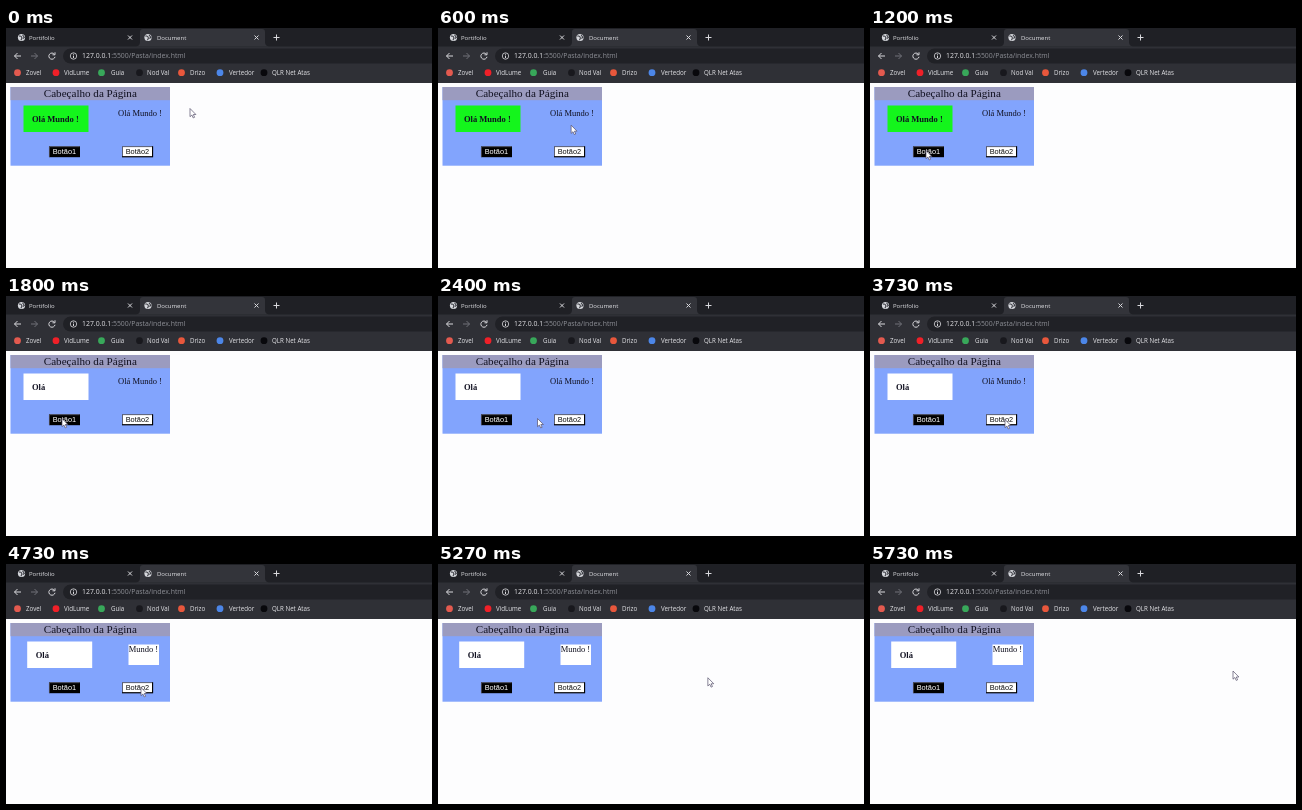
Animation of 426 by 240 pixels, one loop 5790 ms. Source, as an HTML page:

```html
<!DOCTYPE html>
<html lang="pt">
<head>
<meta charset="utf-8">
<style>
html, body { margin: 0; width: 100%; height: 100%; overflow: hidden; background: #fdfdfe; }
svg { display: block; width: 100vw; height: 100vh; }
text { white-space: pre; }
.ui { font: 6px "Open Sans", "Noto Sans", sans-serif; fill: #e4e4e8; }
.page { font: 8.5px "Liberation Serif", serif; fill: #101020; }
.button { font: 7.4px "Liberation Sans", sans-serif; }
.line { fill: none; stroke: #d8d8dc; stroke-width: 1; }
</style>
</head>
<body>
<svg viewBox="0 0 426 240">
  <defs>
    <g id="globe">
      <circle r="3.6" fill="#d5d7dc"/>
      <path d="M-2.6-1.4Q-.4-2 .2-.4T-.6 2.6M1-2.8L2.8-.2 1.4 1" fill="none" stroke="#3a3b42" stroke-width="1.1"/>
    </g>
    <path id="close" class="line" d="M-2-2L2 2M2-2L-2 2"/>
  </defs>

  <!-- browser window -->
  <rect width="426" height="55" fill="#2f3036"/>
  <rect width="426" height="18.5" fill="#1f2025"/>
  <path d="M130 18.5Q134 18 134 14V4Q134 1 137 1H256Q259 1 259 4V14Q259 18 263 18.5Z" fill="#33343a"/>
  <use href="#globe" x="15.5" y="9.5"/>
  <use href="#globe" x="142" y="9.5"/>
  <use href="#close" x="124" y="9.5"/>
  <use href="#close" x="250.5" y="9.5"/>
  <path class="line" d="M267.5 9.5H273.5M270.5 6.5V12.5"/>
  <g class="ui">
    <text x="23" y="11.5">Portifolio</text>
    <text x="151" y="11.5">Document</text>
  </g>
  <rect x="57" y="20.5" width="380" height="15" rx="7.5" fill="#202126"/>
  <path class="line" d="M15 28H8.5M11.5 25L8.5 28L11.5 31"/>
  <path class="line" d="M25 28H31.5M28.5 25L31.5 28L28.5 31" style="stroke:#707178"/>
  <path class="line" d="M48.4 26.2A3.1 3.1 0 1 0 49 28.8M49 24.3V26.8H46.5"/>
  <circle class="line" cx="67.5" cy="28" r="3.2" style="stroke-width:.8"/>
  <path class="line" d="M67.5 27.6V30M67.5 25.8V26.7"/>
  <text class="ui" x="76" y="30.4" style="font-size:6.9px">127.0.0.1<tspan fill="#8d8f96">:5500/Pasta/index.html</tspan></text>
  <g id="bookmarks" class="ui" style="font-size:6.2px"></g>

  <!-- web page -->
  <rect x="4.5" y="59" width="159.5" height="78.7" fill="#82a4fd"/>
  <rect x="4.5" y="59" width="159.5" height="13.2" fill="#9b9bbf"/>
  <g class="page">
    <text x="84.3" y="69.3" text-anchor="middle" style="font-size:11.1px">Cabeçalho da Página</text>
    <g id="left">
      <rect id="leftBox" x="17.5" y="77.5" width="65" height="26.5"/>
      <text id="leftText" x="26" y="93.5" font-weight="bold"></text>
    </g>
    <rect id="rightBox" x="122.5" y="80.5" width="30.5" height="20.5" fill="#fff"/>
    <text id="rightText" y="88"></text>
  </g>
  <g class="button">
    <rect x="43" y="118.3" width="31" height="10.9" fill="#000"/>
    <path d="M43.4 129V118.7H73.6" fill="none" stroke="#686878" stroke-width=".7"/>
    <text x="46.7" y="126.3" fill="#fff">Botão1</text>
    <rect x="116.5" y="118.7" width="30" height="10.1" fill="#fff" stroke="#444450" stroke-width=".8"/>
    <path d="M116 128.7H146.6V118.3" fill="none" stroke="#000" stroke-width="1.1"/>
    <text x="119.7" y="126.3" fill="#111">Botão2</text>
  </g>
  <path id="cursor" d="M0 0V8.2L1.9 6.5L3.2 9.4L4.6 8.8L3.3 6H5.9Z" fill="#fff" stroke="#55506a" stroke-width=".7"/>
</svg>
<script>
const $ = id => document.getElementById(id);
const LOOP = 5790, FIRST_CLICK = 1670, SECOND_CLICK = 4200;

// text x, icon x, icon colour, label
const bookmarks = [
  [20, 11.5, "#e35a4f", "Zovel"],
  [58, 50, "#f02028", "VidLume"],
  [105, 95.5, "#38a85a", "Guia"],
  [141, 133.5, "#18181d", "Nod Val"],
  [184, 175.5, "#e8573c", "Drizo"],
  [223, 214, "#4c86e8", "Vertedor"],
  [266, 258, "#08080c", "QLR Net Atas"]
];
$("bookmarks").innerHTML = bookmarks.map(([x, icon, color, label]) =>
  `<circle cx="${icon}" cy="44.7" r="3.4" fill="${color}"/><text x="${x}" y="47">${label}</text>`).join("");

// time, x, y of the pointer
const path = [
  [0, 184, 80.5], [200, 184, 80.5], [1130, 56, 122.5], [1800, 56, 122.5],
  [2400, 99.5, 122.5], [2950, 135, 123.5], [4850, 135, 123.5],
  [5600, 363, 107], [LOOP, 363, 107]
];

function pointer(t) {
  const i = path.findIndex(p => p[0] > t);
  const [t0, x0, y0] = path[i - 1], [t1, x1, y1] = path[i];
  const u = (t - t0) / (t1 - t0), k = u * u * (3 - 2 * u);
  return [x0 + (x1 - x0) * k, y0 + (y1 - y0) * k];
}

function draw(now) {
  const t = now % LOOP, one = t >= FIRST_CLICK, two = t >= SECOND_CLICK;
  $("leftBox").setAttribute("fill", one ? "#fff" : "#14f51c");
  $("leftText").textContent = one ? "Olá" : "Olá Mundo !";
  $("left").setAttribute("transform", `translate(${two ? 3.7 : 0})`);
  $("rightBox").setAttribute("visibility", two ? "visible" : "hidden");
  $("rightText").textContent = two ? "Mundo !" : "Olá Mundo !";
  $("rightText").setAttribute("x", two ? 122.7 : 112);
  $("cursor").setAttribute("transform", `translate(${pointer(t)})`);
}

const start = performance.now();
function tick() {
  draw(performance.now() - start);
  requestAnimationFrame(tick);
}
tick();
</script>
</body>
</html>
```
